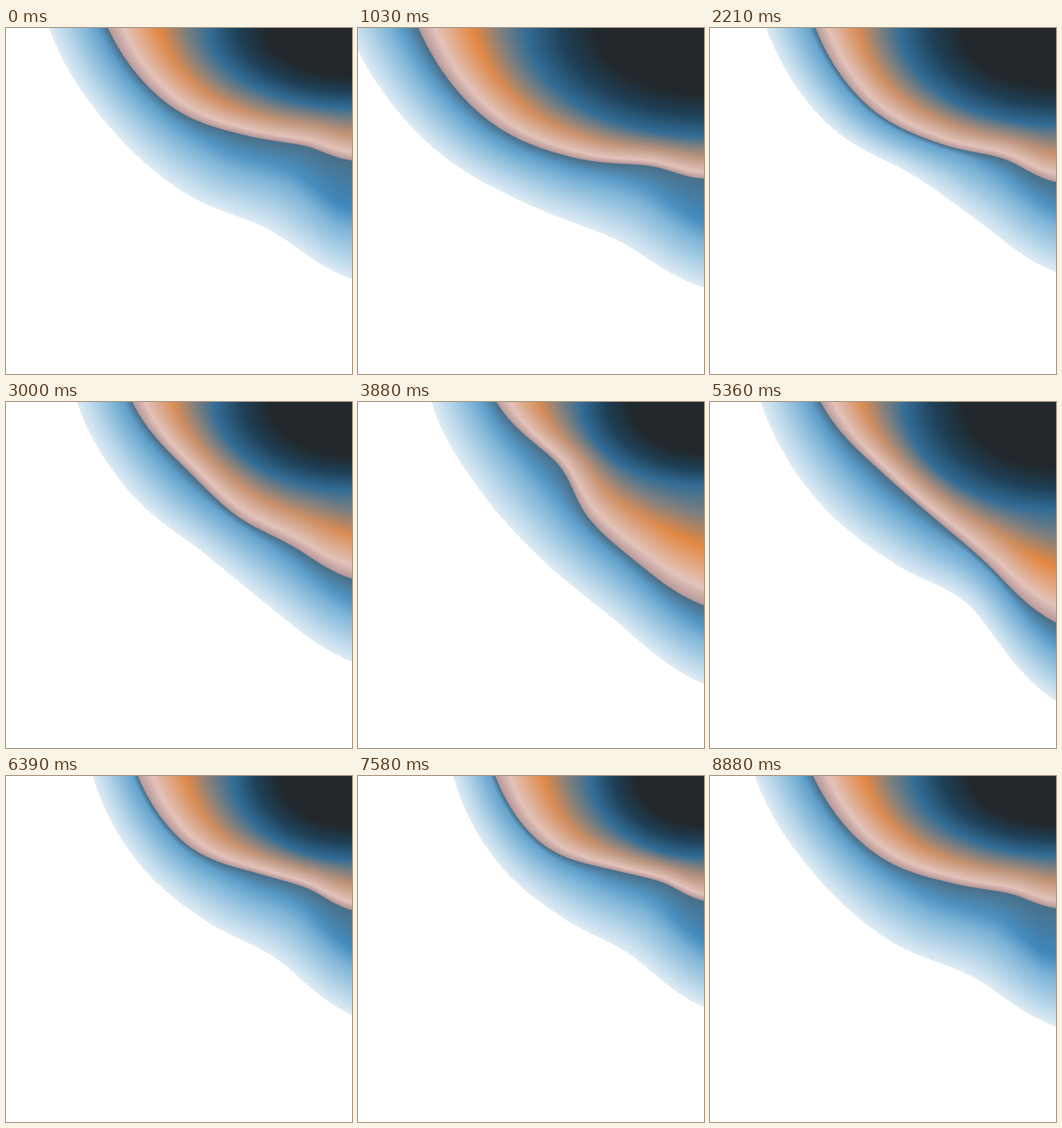
These frames come from a looping animation (400x400 px, 8.91 s). An HTML page with a canvas:

```html
<!DOCTYPE html>
<html>
<head>
<meta charset="utf-8">
<style>
html, body { margin: 0; width: 100%; height: 100%; overflow: hidden; background: #fff; }
canvas { display: block; width: 400px; height: 400px; }
</style>
</head>
<body>
<canvas id="stage" width="400" height="400"></canvas>
<script>
const SIZE = 400, LOOP = 8910, STEPS = 720;
const ctx = document.getElementById('stage').getContext('2d');
const image = ctx.createImageData(SIZE, SIZE);
const pixels = new Uint32Array(image.data.buffer);

// Poses around the top right corner. Edge and halo are radii at five even angles
// from left to down; core holds the two half axes of an elliptic blue ring.
const rest = { edge: [282, 230, 175, 147, 153], halo: [350, 302, 271, 252, 290], core: [165, 92] };
const swell = { edge: [330, 273, 212, 172, 174], halo: [412, 346, 288, 265, 300], core: [205, 125] };
const slim = { edge: [278, 235, 189, 163, 178], halo: [335, 287, 238, 240, 282], core: [180, 112] };
const dent = { edge: [240, 184, 189, 201, 235], halo: [315, 277, 261, 272, 326], core: [142, 97] };
const lean = { edge: [272, 216, 194, 204, 255], halo: [341, 298, 264, 257, 346], core: [175, 125] };
const calm = { edge: [246, 206, 156, 136, 149], halo: [297, 264, 236, 227, 272], core: [135, 95] };
const poses = [[0, rest], [1030, swell], [2210, slim], [3880, dent], [5360, lean], [6500, calm], [8100, calm]];

const rgb = hex => [1, 3, 5].map(i => parseInt(hex.substr(i, 2), 16));
const lerp = (a, b, k) => a + (b - a) * k;
const clamp = v => Math.max(0, Math.min(1, v));
const mix = (a, b, k) => a.map((v, i) => lerp(v, b[i], k));

const [DARK, NAVY, RING, GREY] = ['#22282b', '#1f4057', '#336d96', '#80807f'].map(rgb);
const [TAN, ORANGE, PINK, RIM] = ['#bb9580', '#e48843', '#e3c3ba', '#b89a9a'].map(rgb);
const [SHADOW, BLUE, SKY, MIST, PALE] = ['#4a7089', '#3f88bc', '#7fb5d8', '#b9d7ea', '#dfecf5'].map(rgb);

// Periodic smooth motion through the poses.
function poseAt(t) {
  const n = poses.length;
  const time = i => poses[(i + n) % n][0] + Math.floor(i / n) * LOOP;
  let i = n - 1;
  while (time(i) > t) i--;
  const span = time(i + 1) - time(i), k = (t - time(i)) / span;
  const blend = part => poses[i][1][part].map((a, c) => {
    const value = j => poses[(j + n) % n][1][part][c];
    const slope = j => (value(j + 1) - value(j - 1)) / (time(j + 1) - time(j - 1)) * span;
    const b = value(i + 1), m = slope(i), w = slope(i + 1);
    return a + k * (m + k * (3 * (b - a) - 2 * m - w + k * (2 * (a - b) + m + w)));
  });
  return { edge: blend('edge'), halo: blend('halo'), core: blend('core') };
}

// Smooth curve through evenly spaced values, u from 0 to 1.
function curve(v, u) {
  const last = v.length - 1, i = Math.min(last - 1, Math.floor(u * last)), k = u * last - i;
  const b = v[i], c = v[i + 1];
  const a = i ? v[i - 1] : 2 * b - c, d = i + 2 <= last ? v[i + 2] : 2 * c - b;
  return b + k / 2 * (c - a + k * (2 * a - 5 * b + 4 * c - d + k * (3 * (b - c) + d - a)));
}

// Colour stops along one ray: wide gaps glow orange, thick halos hold their blue longer.
function rayAt(u, { edge, halo, core }) {
  const rim = curve(edge, u), end = curve(halo, u), wide = end - rim;
  const a = u * Math.PI / 2;
  const ring = 1 / Math.hypot(Math.cos(a) / core[0], Math.sin(a) / core[1]);
  const gap = rim - ring;
  const warmth = clamp((gap - 45) / 70), depth = clamp((wide - 55) / 75);
  const reach = lerp(.12, .4, depth);
  const stops = [
    [0, DARK],
    [ring * .6, DARK],
    [ring * .8, NAVY],
    [ring, RING],
    [ring + gap * .25, GREY],
    [ring + gap * .5, mix(TAN, ORANGE, warmth)],
    [ring + gap * .85, PINK],
    [rim - .7, RIM],
    [rim + .7, SHADOW],
    [rim + wide * reach, mix(SKY, BLUE, .4 + .6 * depth)],
    [rim + wide * (reach + .2), SKY],
    [rim + wide * (reach + 1.3) / 2, MIST],
    [end, PALE]
  ].sort((p, q) => p[0] - q[0]);
  return { pos: stops.map(s => s[0]), col: stops.map(s => s[1]), end };
}

const radius = new Float32Array(SIZE * SIZE), angle = new Uint16Array(SIZE * SIZE);
for (let p = 0; p < SIZE * SIZE; p++) {
  const dx = SIZE - p % SIZE - .5, dy = Math.floor(p / SIZE) + .5;
  radius[p] = Math.hypot(dx, dy);
  angle[p] = Math.round(Math.atan2(dy, dx) / (Math.PI / 2) * STEPS);
}

function draw(t) {
  const pose = poseAt(t);
  const rays = Array.from({ length: STEPS + 1 }, (_, i) => rayAt(i / STEPS, pose));
  for (let p = 0; p < pixels.length; p++) {
    const r = radius[p], { pos, col, end } = rays[angle[p]];
    if (r >= end) { pixels[p] = 0xffffffff; continue; }
    let i = 1;
    while (pos[i] <= r) i++;
    const k = (r - pos[i - 1]) / (pos[i] - pos[i - 1]), a = col[i - 1], b = col[i];
    pixels[p] = 0xff000000 | lerp(a[2], b[2], k) << 16 | lerp(a[1], b[1], k) << 8 | lerp(a[0], b[0], k);
  }
  ctx.putImageData(image, 0, 0);
}

const start = performance.now();
function tick() {
  draw((performance.now() - start) % LOOP);
  requestAnimationFrame(tick);
}
tick();
</script>
</body>
</html>
```
